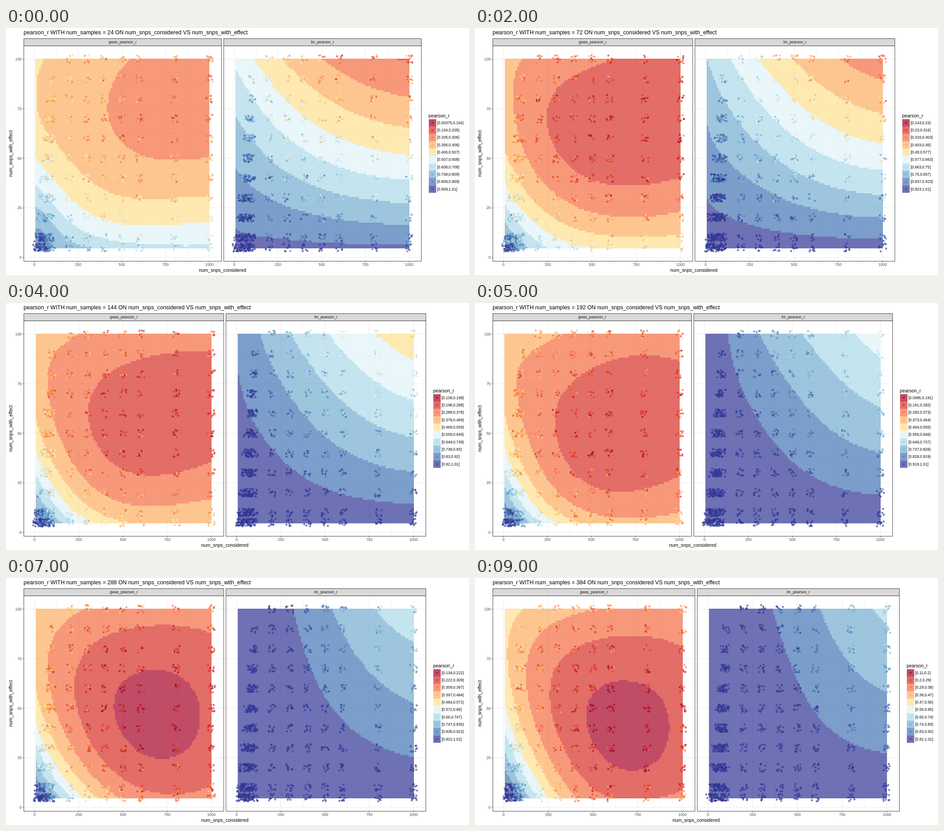
An HTML page with a canvas for the animation above (10000 ms loop, 1025 by 547 pixels).

```html
<!DOCTYPE html>
<html lang="en">
<head>
<meta charset="utf-8">
<title>pearson_r by sample count</title>
<style>
  html, body { margin: 0; width: 100%; height: 100%; overflow: hidden; background: #fff; }
  canvas, svg { position: absolute; left: 0; top: 0; width: 1025px; height: 547px; }
  text { font-family: "Liberation Sans", Arial, sans-serif; white-space: pre; }
</style>
</head>
<body>
<canvas id="plot" width="1025" height="547"></canvas>
<svg id="labels" viewBox="0 0 1025 547"></svg>
<script>
const W = 1025, H = 547, STEP = 1000, LEFT = 39.5, TOP = 39.5, BOTTOM = 516.5;
const COLS = 100, ROWS = 96, TILE_X = 9.95, TILE_Y = 0.997;
const PALETTE = ["#a50026", "#d73027", "#f46d43", "#fdae61", "#fee090",
                 "#e0f3f8", "#abd9e9", "#74add1", "#4575b4", "#313695"];
const ctx = document.getElementById("plot").getContext("2d");
const labels = document.getElementById("labels");

// Both surfaces are smooth polynomials through a few heights, given in band units.
// Columns stand at these x, rows at these y; the power evens out the spacing.
const NODES_X = [5, 100, 300, 600, 1000];
const PANELS = {
  gwas: { nodesY: [5, 25, 55, 100], power: 0.5 },
  lm: { nodesY: [5, 55, 100], power: 1 }
};

const scenes = [];
scenes[0] = { n: 24, right: 919.5, lo: 0.00375, hi: 1.01005,
  gwas: [[8.7, 8.1, 7, 6.25, 6.1], [6.93, 6.25, 4.87, 4.3, 4.4],
         [4.8, 4.2, 3.5, 2.92, 2.85], [4.4, 3.9, 3.5, 2.9, 2.6]],
  lm: [[9.3, 9.25, 9.25, 9.18, 9.12], [7.64, 7.18, 6.32, 5.36, 4.75], [5.75, 5.1, 3.87, 2.68, 1.91]] };
scenes[1] = { n: 48, right: 914.5, lo: -0.0192, hi: 1.01,
  gwas: [[8.7, 8, 6.9, 5.95, 6.02], [6.75, 5.92, 4.82, 4.13, 4.25],
         [4.85, 4.2, 3.45, 2.93, 2.9], [4.5, 4.1, 3.6, 3.25, 2.6]],
  lm: [[9.6, 9.55, 9.47, 9.42, 9.38], [8.25, 7.81, 7.05, 6.06, 5.45], [6.8, 6.1, 4.98, 3.66, 2.83]] };
scenes[2] = { n: 72, right: 929.5, lo: 0.1431, hi: 1.01,
  gwas: [[8.6, 7.5, 5.65, 4.85, 4.7], [6.23, 4.95, 3.48, 2.68, 2.87],
         [3.92, 3.08, 1.97, 1.45, 1.5], [3.5, 3.02, 2.5, 2.03, 1.6]],
  lm: [[9.6, 9.55, 9.5, 9.45, 9.38], [8.4, 7.87, 7.1, 6, 5.18], [7, 6.3, 5, 3.55, 2.45]] };
scenes[3] = { n: 96, right: 929.5, lo: 0.116, hi: 1.01,
  gwas: [[8.9, 7.9, 5.4, 4.4, 4.5], [6.2, 4.95, 3.3, 2.6, 2.85],
         [4.07, 3.12, 2.1, 1.55, 1.65], [3.5, 3.25, 2.75, 2.45, 2.1]],
  lm: [[9.9, 9.75, 9.6, 9.55, 9.5], [8.96, 8.5, 7.75, 6.7, 5.86], [7.9, 7.2, 6, 4.5, 3.25]] };
scenes[5] = { n: 192, right: 924.5, lo: 0.0995, hi: 1.01,
  gwas: [[9, 7.85, 4.95, 3.35, 3.3], [6.82, 4.85, 2.75, 1.8, 2.15],
         [4.3, 3.1, 1.97, 1.3, 1.4], [3.5, 3.4, 3.07, 2.6, 2.65]],
  lm: [[10, 9.9, 9.85, 9.75, 9.7], [9.8, 9.5, 9.05, 8.2, 7.35], [9.55, 9.2, 8.07, 6.85, 5.55]] };
scenes[7] = { n: 288, right: 929.5, lo: 0.134, hi: 1.01,
  gwas: [[8.9, 7.95, 4.6, 2.4, 2.35], [6.95, 4.9, 2.55, 1.1, 1.5],
         [4.3, 3, 1.6, 0.72, 1.25], [4.02, 3.6, 2.95, 2.55, 2.5]],
  lm: [[10, 10, 9.95, 9.85, 9.8], [9.9, 9.8, 9.5, 8.75, 7.92], [9.7, 9.6, 9.08, 7.72, 6.5]] };
scenes[9] = { n: 384, right: 939.5, lo: 0.11, hi: 1.01,
  gwas: [[9.3, 8, 4.1, 2, 2.2], [7.4, 5.25, 2.55, 0.9, 1.45],
         [4.85, 3.4, 1.75, 0.8, 1.35], [4.6, 4.05, 3.4, 2.9, 2.85]],
  lm: [[10, 10, 9.95, 9.85, 9.8], [9.9, 9.8, 9.6, 8.87, 8.1], [9.8, 9.65, 9.2, 8.1, 6.8]] };

function between(a, b) {
  const mean = (p, q) => (p + q) / 2;
  const mix = name => a[name].map((row, j) => row.map((v, i) => mean(v, b[name][j][i])));
  return { n: mean(a.n, b.n), right: 929.5, lo: mean(a.lo, b.lo), hi: 1.01, gwas: mix("gwas"), lm: mix("lm") };
}
for (const i of [4, 6, 8]) scenes[i] = between(scenes[i - 1], scenes[i + 1]);

// Lagrange weights of the nodes at t, on a power scale.
function weights(nodes, t, power) {
  const s = nodes.map(v => v ** power), u = t ** power;
  return s.map((a, i) => s.reduce((w, b, j) => i === j ? w : w * (u - b) / (a - b), 1));
}

function surface(rows, { nodesY, power }) {
  return (x, y) => {
    const wx = weights(NODES_X, x, 0.5), wy = weights(nodesY, y, power);
    return rows.reduce((sum, row, j) => sum + wy[j] * row.reduce((s, v, i) => s + wx[i] * v, 0), 0);
  };
}

const toBand = v => Math.max(0, Math.min(9, Math.floor(v)));
const toY = y => 508 - 4.39 * y;

function panelOf(scene, name) {
  const w = (scene.right - LEFT - 5) / 2;
  const left = name === "gwas" ? LEFT : scene.right - w;
  return { left, w, toX: x => left + 0.0535 * w + 0.000885 * w * x };
}

function random(seed) {
  return () => {
    seed = seed + 0x6d2b79f5 | 0;
    let t = Math.imul(seed ^ seed >>> 15, seed | 1);
    t ^= t + Math.imul(t ^ t >>> 7, t | 61);
    return ((t ^ t >>> 14) >>> 0) / 4294967296;
  };
}

function line(x1, y1, x2, y2, color, width) {
  ctx.strokeStyle = color;
  ctx.lineWidth = width;
  ctx.beginPath();
  ctx.moveTo(x1, y1);
  ctx.lineTo(x2, y2);
  ctx.stroke();
}

function dot(x, y, band) {
  ctx.strokeStyle = ctx.fillStyle = PALETTE[band];
  ctx.lineWidth = 0.8;
  ctx.beginPath();
  ctx.arc(x, y, 1.8, 0, 7);
  ctx.stroke();
  ctx.beginPath();
  ctx.arc(x, y, 0.95, 0, 7);
  ctx.fill();
}

function drawTiles(field, toX) {
  const edgeX = c => Math.round(toX(6 + c * TILE_X));
  const edgeY = r => Math.round(toY(4.5 + r * TILE_Y));
  ctx.globalAlpha = 0.7;
  for (let r = 0; r < ROWS; r++)
    for (let c = 0; c < COLS; c++) {
      const x = edgeX(c), y = edgeY(r + 1);
      ctx.fillStyle = PALETTE[toBand(field(6 + (c + 0.5) * TILE_X, 4.5 + (r + 0.5) * TILE_Y))];
      ctx.fillRect(x, y, edgeX(c + 1) - x, edgeY(r) - y);
    }
  ctx.globalAlpha = 1;
}

function drawPoints(field, toX, name, index) {
  const lm = name === "lm", rnd = random(index * 2 + lm + 11);
  const tens = Array.from({ length: 10 }, (_, i) => 10 * (i + 1));
  const xs = [...tens, 200, 300, 400, 500, 600, 800, 1000];
  for (const y of [5, ...tens])
    for (const x of xs) {
      if (x <= y) continue;
      const v = field(x, y);
      const bias = lm ? (x <= 100 ? 0.7 : 0.1) : (x <= 60 && y <= 10 ? 1 : 0.2);
      const spread = lm ? Math.min(1, 0.25 * (11 - v)) * (1 - 0.06 * index) : 0.8;
      for (let i = 0; i < 10; i++) {
        const noise = (rnd() + rnd() + rnd() + rnd() - 2) * 1.6 * spread;
        dot(toX(x + (rnd() - 0.5) * 40), toY(y + (rnd() - 0.5) * 4), toBand(v + bias + noise));
      }
    }
}

function text(x, y, size, str, anchor = "start", fill = "#000", extra = "") {
  return `<text x="${x}" y="${y}" font-size="${size}" text-anchor="${anchor}" fill="${fill}" ${extra}>${str}</text>`;
}

function drawPanel(scene, name, index) {
  const { left, w, toX } = panelOf(scene, name);
  for (const minor of [1, 0]) {
    const width = minor ? 0.4 : 0.8;
    for (let i = 0; i < 5 - minor; i++) {
      const x = toX(250 * i + 125 * minor), y = toY(25 * i + 12.5 * minor);
      line(x, TOP, x, BOTTOM, "#e6e6e6", width);
      line(left, y, left + w, y, "#e6e6e6", width);
    }
  }
  const field = surface(scene[name], PANELS[name]);
  drawTiles(field, toX);
  drawPoints(field, toX, name, index);

  ctx.fillStyle = "#d9d9d9";
  ctx.fillRect(left, 23.5, w, TOP - 23.5);
  ctx.strokeStyle = "#333";
  ctx.lineWidth = 0.9;
  ctx.strokeRect(left, 23.5, w, TOP - 23.5);
  ctx.strokeRect(left, TOP, w, BOTTOM - TOP);

  let out = text(left + w / 2, 34, 8.4, name + "_pearson_r", "middle", "#1a1a1a");
  for (let v = 0; v <= 1000; v += 250) {
    line(toX(v), BOTTOM, toX(v), BOTTOM + 2.7, "#333", 0.8);
    out += text(toX(v), 527.2, 8.4, v, "middle", "#4d4d4d");
  }
  return out;
}

function drawLegend(scene) {
  const x = scene.right + 16.5, size = 16.35;
  const label = k => String(Number((scene.lo + k * (scene.hi - scene.lo) / 10).toPrecision(3))).replace("-", "–");
  let out = text(x - 0.5, 198, 10.4, "pearson_r");
  PALETTE.forEach((color, k) => {
    const y = 201.5 + k * size, top = Math.round(y);
    ctx.globalAlpha = 0.7;
    ctx.fillStyle = color;
    ctx.fillRect(x, top, size, Math.round(y + size) - top);
    ctx.globalAlpha = 1;
    dot(x + size / 2, y + size / 2, k);
    out += text(x + 18.5, y + size / 2 + 3, 8.4, `[${label(k)},${label(k + 1)}${k === 9 ? "]" : ")"}`);
  });
  return out;
}

function draw(index) {
  const s = scenes[index];
  ctx.fillStyle = "#fff";
  ctx.fillRect(0, 0, W, H);
  let out = text(39, 14, 12.4,
    `pearson_r WITH num_samples = ${s.n} ON num_snps_considered VS num_snps_with_effect`);
  out += drawPanel(s, "gwas", index) + drawPanel(s, "lm", index) + drawLegend(s);
  for (let v = 0; v <= 100; v += 25) {
    line(LEFT - 2.7, toY(v), LEFT, toY(v), "#333", 0.8);
    out += text(34.5, toY(v) + 3, 8.4, v, "end", "#4d4d4d");
  }
  out += text((LEFT + s.right) / 2, 539.5, 10.4, "num_snps_considered", "middle");
  out += text(0, 0, 10.4, "num_snps_with_effect", "middle", "#000",
    'transform="translate(13.5 278) rotate(-90)"');
  labels.innerHTML = out;
}

let shown = -1;
function tick() {
  const index = Math.floor(performance.now() / STEP) % scenes.length;
  if (index !== shown) draw(shown = index);
  requestAnimationFrame(tick);
}
tick();
</script>
</body>
</html>
```
